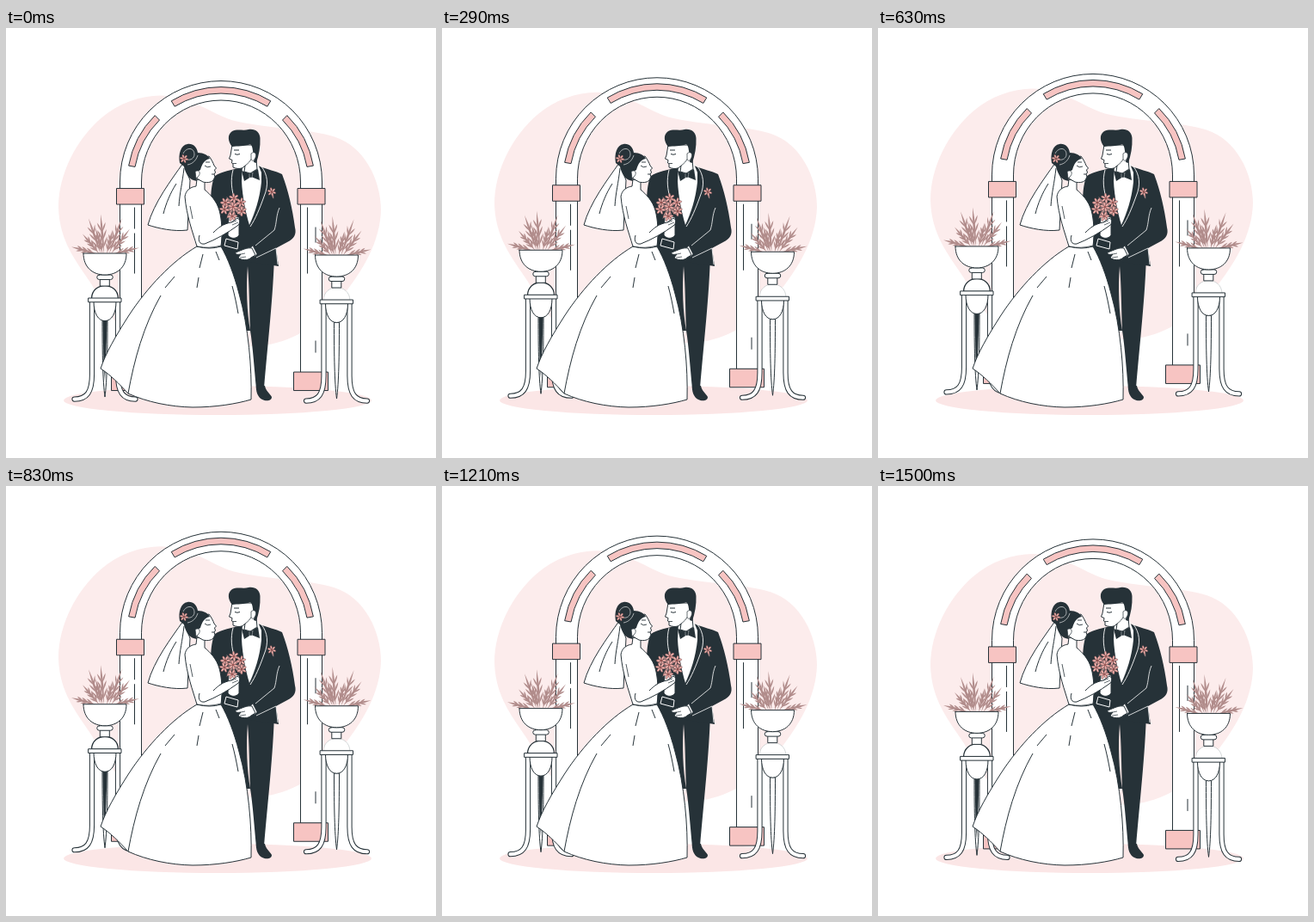
Animation of 500x500 px, one loop 1540 ms. Source, as an HTML page with a canvas:

```html
<!DOCTYPE html>
<html lang="en">
<head>
<meta charset="utf-8">
<title>Wedding</title>
<style>
html, body { margin: 0; width: 100%; height: 100%; overflow: hidden; background: #fff; }
canvas { display: block; width: 100vw; height: 100vh; }
</style>
</head>
<body>
<canvas id="stage" width="500" height="500"></canvas>
<script>
const ctx = document.getElementById('stage').getContext('2d');
const INK = '#263238', WHITE = '#fff', PINK = '#f7c4c2', BLUSH = '#fcecec',
      FLOOR = '#fbe6e6', LEAF = '#b18c8b', ROSE = '#f2b0ab';
const LOOP = 1540, STEPS = 37, LIFT = 10, LEAD = 35;

function shape(d, fill, stroke, width = 1) {
  const path = new Path2D(d);
  if (fill) { ctx.fillStyle = fill; ctx.fill(path); }
  if (stroke) { ctx.strokeStyle = stroke; ctx.lineWidth = width; ctx.stroke(path); }
}

function box(x, y, w, h, fill) {
  shape(`M${x} ${y}h${w}v${h}h${-w}Z`, fill, INK);
}

// Band of a ring around the arch centre, angles in degrees
function band(inner, outer, from, to) {
  const rad = Math.PI / 180;
  ctx.beginPath();
  ctx.arc(250, 179.5, outer, from * rad, to * rad);
  ctx.arc(250, 179.5, inner, to * rad, from * rad, true);
  ctx.closePath();
  ctx.fillStyle = PINK;
  ctx.fill();
  ctx.strokeStyle = INK;
  ctx.lineWidth = 1;
  ctx.stroke();
}

function flower(x, y, r, turn = 0) {
  for (let i = 0; i < 6; i++) {
    ctx.save();
    ctx.translate(x, y);
    ctx.rotate(turn + i * Math.PI / 3);
    ctx.beginPath();
    ctx.ellipse(r * .58, 0, r * .44, r * .22, 0, 0, 7);
    ctx.fillStyle = ROSE;
    ctx.fill();
    ctx.strokeStyle = '#54393c';
    ctx.lineWidth = .4;
    ctx.stroke();
    ctx.restore();
  }
  ctx.beginPath();
  ctx.arc(x, y, r * .18, 0, 7);
  ctx.fillStyle = '#a35452';
  ctx.fill();
}

function leaf(x, y, angle, length, width) {
  ctx.save();
  ctx.translate(x, y);
  ctx.rotate(angle);
  ctx.beginPath();
  ctx.moveTo(0, 0);
  ctx.quadraticCurveTo(length * .5, -width, length, 0);
  ctx.quadraticCurveTo(length * .5, width, 0, 0);
  ctx.fill();
  ctx.restore();
}

function frond(x, y, tipX, tipY) {
  const dx = tipX - x, dy = tipY - y;
  const angle = Math.atan2(dy, dx), length = Math.hypot(dx, dy);
  ctx.fillStyle = LEAF;
  leaf(x, y, angle, length, 2.6);
  for (let s = .15; s < .7; s += .2) {
    for (const side of [-1, 1]) {
      leaf(x + dx * s, y + dy * s, angle + side * .42, length * (.32 - s * .1), 1.8);
    }
  }
}

function drawBlob() {
  shape(`M61 209C61 170 82 130 111 105C131 88 156 79 180 79C214 79 236 99 264 108
    C304 118 351 117 382 127C417 138 436 178 436 212C435 249 415 282 393 310
    C370 340 344 360 309 368C270 374 205 372 160 361C119 349 113 316 93 289
    C76 264 62 243 61 209Z`, BLUSH);
}

function drawArch() {
  shape(`M132.5 401V179.5A117.5 117.5 0 0 1 367.5 179.5V401H342.5V179.5
    A92.5 95 0 0 0 157.5 179.5V401Z`, WHITE, INK);
  band(103, 110.5, -121.5, -58.5);
  band(101.5, 109, -170, -134.8);
  band(101.5, 109, -45.2, -10);
  box(128.5, 187, 32, 18.5, PINK);
  box(339, 187, 32, 18.5, PINK);
  box(122.5, 400.5, 41, 21.5, PINK);
  box(334.5, 400.5, 40, 21.5, PINK);
  shape('M149.5 209V234M149.5 239V286M350.5 209V286M360 232V250M360 364V378', null, INK);
}

function drawStand(x, y, bold) {
  ctx.save();
  ctx.translate(x, y);
  ctx.lineCap = 'round';
  const spike = 'M-3 22C-3 60 -2.5 92 0 110.5C2.5 92 3 60 3 22Z';
  shape(spike, WHITE, INK);
  if (bold) shape('M-2.6 18L-1.5 72L0 92L1 72L2.8 18Z', INK);
  for (const side of [-1, 1]) {
    const leg = `M${side * 15} 0V84C${side * 15} 105 ${side * 21} 113 ${side * 35.5} 113`;
    shape(leg, null, INK, 6.2);
    shape(leg, null, WHITE, 4.2);
  }
  shape('M-13 0C-13 13 -8 22 0 22C8 22 13 13 13 0Z', WHITE, INK);
  shape('M-15.5 -4C-15 -24 15 -24 15.5 -4Z', WHITE, bold ? INK : '#a9b0b3', bold ? 1.3 : .5);
  box(-19, -4.5, 38, 4.7, WHITE);
  box(-5.3, -27, 10.6, 8.5, WHITE);
  shape('M-6.5 -31.5H6.5A2.7 2.7 0 0 1 6.5 -26H-6.5A2.7 2.7 0 0 1 -6.5 -31.5Z', WHITE, INK);
  const tips = [[-5, -102], [-19, -97], [-26, -79], [20, -98], [29, -85],
                [-39, -64], [40, -63], [9, -84], [-11, -86]];
  for (const [tx, ty] of tips) frond(tx * .25, -56, tx, ty);
  shape('M-25 -56.5H25C25 -40 14 -31.5 0 -31.5S-25 -40 -25 -56.5Z', WHITE, INK);
  ctx.restore();
}

function drawGroom() {
  // Legs and shoe
  shape(`M248 252L312 262C311 310 304 370 300 419L291 419C289 400 287 370 284 352
    L274 352L255 270Z`, INK);
  shape('M281 277C279 302 280 330 284 352C283 326 283 300 281 277Z', '#efdedd');
  shape('M291 415L301 416C302 422 307 425 309 429C309 434 302 434 298 432C293 430 290 422 291 415Z', INK);
  // Jacket
  shape(`M273 162C263 165 250 167 243 172C238 181 237 202 239 228L247 266L278 271L317 277
    L314 256L327 249C335 245 338 240 336 232C333 210 328 188 321 170C314 166 304 165 293 160Z`, INK);
  // Shirt, neck and lapels
  shape('M275 159L292 156L297 168L297 179C295 199 289 216 283 229C279 216 275 198 274 178Z', WHITE);
  shape(`M264 165C261 176 262 188 266 200M297 161C304 170 306 182 300 196
    C295 210 290 222 284 231`, null, WHITE, .9);
  shape('M274 166L283 169L293 164L295 177L285 173L277 178Z', INK);
  shape('M283 168L287 168L286 174L283 174Z', INK, WHITE, .4);
  // Head
  shape(`M263 136L261 148L259.5 152L263 153.5L262.5 157L264 158L264 162
    C271 165 276 163 278 160L277 167L284 169L292 164L291 153L288 136Z`, WHITE, INK);
  shape('M278 160C281 158 284 155 286 151M264 157.5H268', null, INK, .8);
  shape('M265 142L271 142M266 146.5Q269 148 272 146.5', null, INK, 1);
  shape(`M263 138C258 132 257 124 263 120C269 117 276 120 282 118C290 117 295 121 295.5 128
    C296 138 294 148 291 157L288 156L289 149C286 145 288 138 284 135C277 138 269 137 263 138Z`, INK);
  shape('M285 146C290 142 293 148 288 154C286 155 285 153 285 151Z', WHITE, INK, .7);
  // Sleeve, pocket and hand
  shape('M318 209C314 218 315 226 312 235L290 253M291 267L314 256L316 275', null, WHITE, .8);
  shape('M256 245L270 249L269 257L254 253Z', INK, WHITE, 1);
  shape('M287 253L292 263L289 266L284 256Z', WHITE, INK, .7);
  shape('M286 256C280 255 275 258 267 261C266 263 269 264 273 263L270 267C273 270 281 271 285 267L290 264Z', WHITE, INK);
  shape('M273 263L278 262M272 267L279 266', null, INK, .7);
  ctx.fillStyle = LEAF;
  leaf(309, 191, 1.3, 8, 2);
  flower(309, 190.5, 5, .3);
}

function drawBouquet() {
  shape('M259 218L258 241C262 246 268 245 271 241L271 220Z', WHITE, INK);
  ctx.fillStyle = LEAF;
  for (let i = 0; i < 9; i++) leaf(264, 209, i * .698, 15, 3);
  const heads = [[255, 203], [265, 198], [273, 203], [254, 211], [274, 213], [263, 219], [264, 208]];
  heads.forEach(([x, y], i) => flower(x, y, 5.8, i * .4));
}

function drawBride() {
  // Veil
  shape('M206 157C192 177 172 203 165 229C177 233 195 237 211 235L214 177Z', WHITE, INK);
  shape('M198 181C191 192 186 204 183 216M207 163C205 181 202 191 201 207', null, INK);
  // Skirt
  shape(`M222 254C193 271 164 302 143 334C127 359 116 378 110 396C121 403 132 414 142 425
    C164 435 191 440.5 217 441C244 441 268 437 285 432C286 395 282 348 271 309
    C265 286 258 268 250 254Z`, WHITE, INK);
  shape(`M180 311C160 346 149 386 142 425M196 289L185 302M229 263L225 279M224 290L222 302
    M263 300C266 311 268 321 270 332M244 260L248 270`, null, INK);
  // Neck and bodice
  shape(`M222 176L221 184C214 185 209 189 208 196C210 219 217 237 222 254Q237 258 250 254
    C252 238 251 223 248 212C245 201 237 193 231 188L231 178Z`, WHITE, INK);
  shape('M214 207L217 222M222 254Q236 257 250 253', null, INK, .8);
  // Head
  shape(`M222 153L236 149C239 153 241 157 242 160L244.5 163L242.5 165L243.5 168L242 170
    L243 173L241 177C238 180 233 180 229 179L222 175Z`, WHITE, INK);
  shape('M231 160Q234 163 238 161M232 156L237 156M239 170H242', null, INK, .9);
  shape(`M202 157C200 147 203 136 211 135C217 134 222 138 223 145C230 145 235 148 237 152
    C231 153 228 158 226 165L221 168L222 178C213 177 209 170 207 161Z`, INK);
  shape('M206 146C210 138 219 139 219 147C219 151 215 154 211 153M211 159C217 158 221 154 223 148', null, WHITE, .6);
  shape('M220 167C224 164 227 168 224 172L221 175Z', WHITE, INK, .7);
  flower(207, 152, 5, .2);
}

function drawArm() {
  shape(`M225 241C223 247 225 252 231 251C244 246 258 238 269 230C273 227 272 222 269 221
    L262 226C252 228 247 232 241 238`, WHITE, INK);
  shape('M262 226L268 224M263 229L270 226', null, INK, .7);
}

function draw(now) {
  const stepMs = LOOP / STEPS;
  const time = Math.floor((now % LOOP + 3) / stepMs) * stepMs;
  const phase = (time + LEAD) % LOOP / LOOP;
  const rise = LIFT * (1 - Math.abs(2 * phase - 1));

  ctx.lineJoin = 'round';
  ctx.fillStyle = WHITE;
  ctx.fillRect(0, 0, 500, 500);
  ctx.save();
  ctx.translate(0, -rise);
  drawBlob();
  ctx.restore();

  ctx.beginPath();
  ctx.ellipse(246, 433, 179, 17, 0, 0, 7);
  ctx.fillStyle = FLOOR;
  ctx.fill();

  ctx.save();
  ctx.translate(0, -rise);
  drawArch();
  drawStand(115, 319, true);
  drawStand(384.5, 321, false);
  ctx.restore();

  drawGroom();
  drawBride();
  drawBouquet();
  drawArm();
  requestAnimationFrame(draw);
}
draw(0);
</script>
</body>
</html>
```
